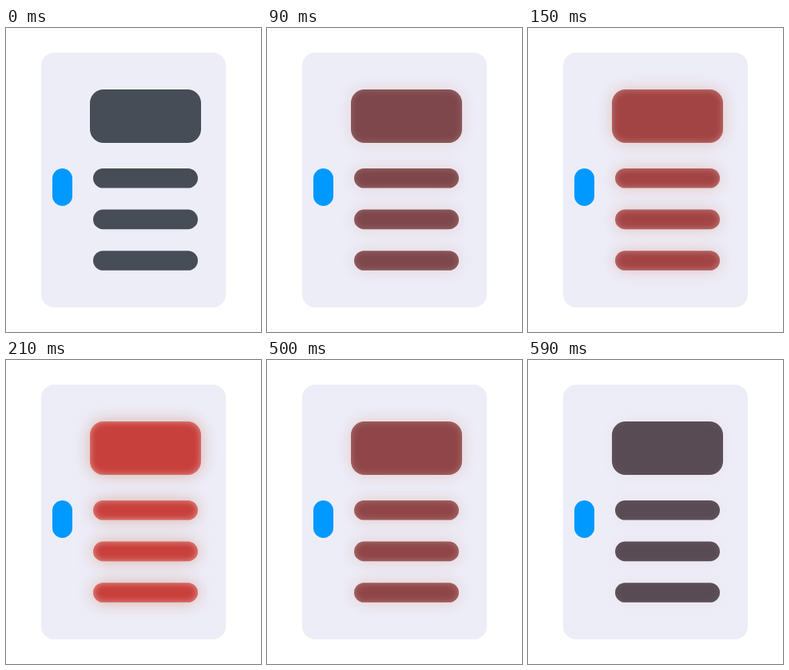
An HTML page with a canvas that plays this animation: 319x381 px, repeating every 0.62 s.

```html
<!DOCTYPE html>
<html lang="en">
<head>
<meta charset="utf-8">
<title>Card highlight</title>
<style>
  html, body { margin: 0; width: 100%; height: 100%; overflow: hidden; background: #fff; }
  canvas { display: block; }
</style>
</head>
<body>
<canvas id="stage" width="319" height="381"></canvas>
<script>
const ctx = document.getElementById("stage").getContext("2d");
const LOOP = 620, STEP = 30, STEPS = 7, FADE_START = 440;
const IDLE = [70, 77, 87], HOT = [200, 64, 60];
const FAR = 1000; // offset that keeps shadow casters off stage

// Adds the header block and the three bars to the current path.
function addBlocks(dx = 0) {
  ctx.roundRect(105 + dx, 77, 139, 67, 17);
  for (let i = 0; i < 3; i++) {
    ctx.roundRect(109 + dx, 176 + i * 51.6, 131, 24.6, 12.3);
  }
}

function fillRound(color, ...box) {
  ctx.beginPath();
  ctx.roundRect(...box);
  ctx.fillStyle = color;
  ctx.fill();
}

function castShadow(color, blur, buildPath) {
  ctx.save();
  ctx.shadowColor = color;
  ctx.shadowBlur = blur;
  ctx.shadowOffsetX = FAR;
  ctx.fillStyle = "#000";
  ctx.beginPath();
  buildPath();
  ctx.fill("evenodd");
  ctx.restore();
}

// Rises in seven steps, holds, then falls in seven steps.
function heatAt(time) {
  if (time < FADE_START) return Math.min(STEPS, Math.floor(time / STEP)) / STEPS;
  return Math.max(0, STEPS - 1 - Math.floor((time - FADE_START) / STEP)) / STEPS;
}

function draw(heat) {
  ctx.fillStyle = "#fff";
  ctx.fillRect(0, 0, 319, 381);
  fillRound("#ededf8", 44, 31, 231, 319, 16);
  fillRound("#0099ff", 58, 176, 25, 47, 12.5);

  if (heat > 0) {
    castShadow(`rgba(200, 120, 90, ${0.5 * heat})`, 20, () => addBlocks(-FAR));
  }

  const rgb = IDLE.map((c, i) => Math.round(c + (HOT[i] - c) * heat));
  ctx.beginPath();
  addBlocks();
  ctx.fillStyle = `rgb(${rgb})`;
  ctx.fill();

  if (heat > 0) {
    ctx.save();
    ctx.clip();
    castShadow(`rgba(255, 245, 240, ${0.5 * heat})`, 9, () => {
      ctx.rect(-FAR, 0, 319, 381);
      addBlocks(-FAR);
    });
    ctx.restore();
  }
}

const start = performance.now();
function tick() {
  draw(heatAt((performance.now() - start) % LOOP));
  requestAnimationFrame(tick);
}
tick();
</script>
</body>
</html>
```
